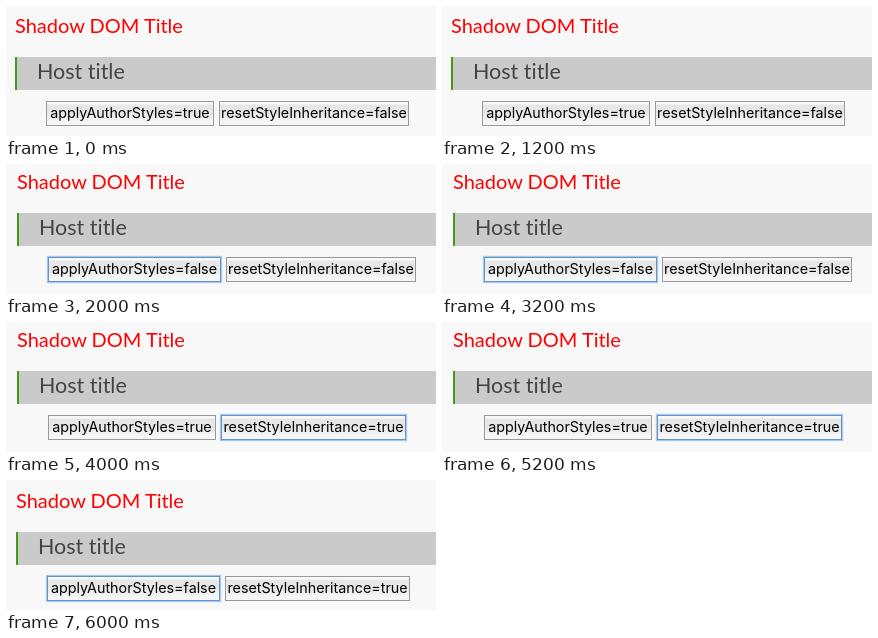
These frames come from a looping animation (430x130 px, 8 s). An HTML page:

```html
<!DOCTYPE html>
<html lang="en">
<head>
<meta charset="utf-8">
<title>Shadow DOM Title</title>
<style>
  html, body {
    margin: 0;
    width: 100%;
    height: 100%;
    overflow: hidden;
    background: #f8f8f8;
  }

  .stage {
    position: relative;
    width: 100%;
    height: 100%;
    overflow: clip;
  }

  .page {
    position: absolute;
    inset: 0;
    animation: shift 8s step-end infinite;
  }

  .page > * {
    position: absolute;
    margin: 0;
    box-sizing: border-box;
    white-space: nowrap;
  }

  h1, h2 {
    font-family: Lato, sans-serif;
    font-weight: 400;
    font-variant-ligatures: none;
  }

  h1 {
    left: 9px;
    top: 9px;
    font-size: 20px;
    line-height: 20px;
    color: #f00;
  }

  h2 {
    left: 9px;
    right: 0;
    top: 51px;
    height: 33px;
    padding-left: 20px;
    border-left: 2px solid #419c14;
    background: #cacaca;
    box-shadow: 2px 0 #cacaca;
    font-size: 21.5px;
    line-height: 29px;
    color: #444;
  }

  .button {
    top: 95px;
    height: 25px;
    border: 1px solid #999;
    background: linear-gradient(#f8f8f8 8%, #e7e7e7 14% 50%, #f6f6f6 85%);
    font: 14.3px/22px Inter, sans-serif;
    color: #000;
    display: flex;
    justify-content: center;
  }

  .author { left: 40px; }
  .author.on { width: 168px; animation: first 4s step-end infinite; }
  .author.off { width: 173px; animation: second 4s step-end infinite; }

  .reset { left: 213px; }
  .reset.off {
    width: 190px;
    animation: first 8s step-end infinite, slide 4s step-end infinite;
  }
  .reset.on {
    width: 185px;
    animation: second 8s step-end infinite, slide 4s step-end infinite,
      blur 8s step-end infinite;
  }

  .focus {
    border-color: #5f96cf;
    box-shadow: 0 0 1px 1px #a9c9ea;
  }

  @keyframes shift {
    0% { transform: none; }
    25% { transform: translate(2px, -2px); }
    75% { transform: translate(1px, 1px); }
  }
  @keyframes first { 0% { opacity: 1; } 50%, 100% { opacity: 0; } }
  @keyframes second { 0% { opacity: 0; } 50%, 100% { opacity: 1; } }
  @keyframes slide { 0% { left: 213px; } 50%, 100% { left: 218px; } }
  @keyframes blur { 75%, 100% { border-color: #999; box-shadow: none; } }
</style>
</head>
<body>
<div class="stage">
  <div class="page">
    <h1>Shadow DOM Title</h1>
    <h2>Host title</h2>
    <div class="button author on">applyAuthorStyles=true</div>
    <div class="button author off focus">applyAuthorStyles=false</div>
    <div class="button reset off">resetStyleInheritance=false</div>
    <div class="button reset on focus">resetStyleInheritance=true</div>
  </div>
</div>
</body>
</html>
```
